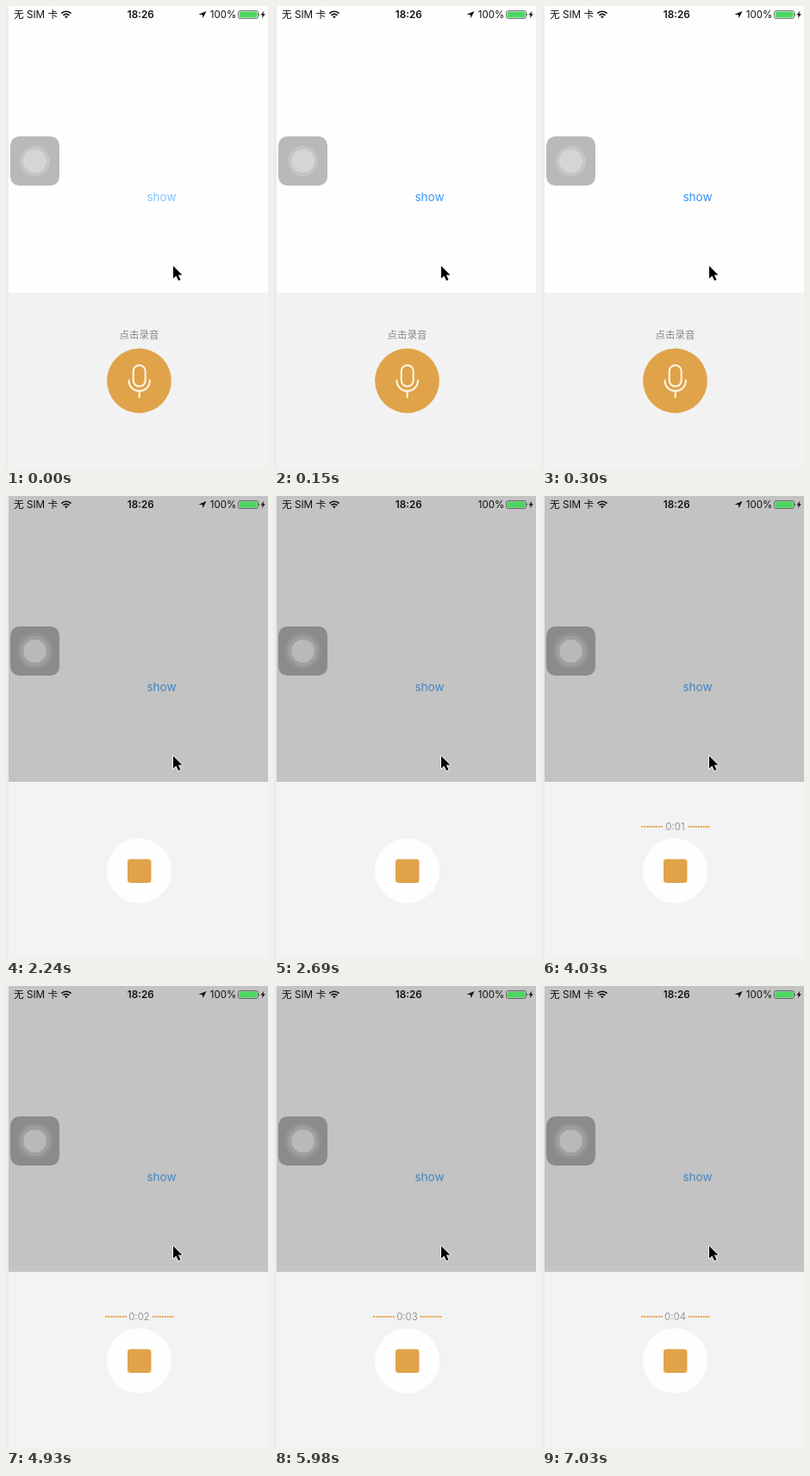
These frames come from a looping animation (304 by 535 pixels, 8 s). An HTML page:

```html
<!DOCTYPE html>
<html lang="zh">
<head>
<meta charset="utf-8">
<title>Recorder</title>
<style>
html, body { margin: 0; width: 100%; height: 100%; overflow: hidden; background: #ebebeb; }
svg { position: absolute; left: 0; top: 0; display: block; }
text { font-family: Inter, "Noto Sans CJK SC", "Noto Sans CJK", sans-serif; }
.idle, .live, .show, .arrow, .timer, .count::before { animation: 8s step-end infinite; }
.idle { animation-name: idle; }
.live { animation-name: live; }
.show { animation-name: show; }
.arrow { animation-name: arrow; }
.timer { animation-name: timer; }
.count {
  position: absolute; left: 134.5px; top: 376px; width: 40px; height: 14px;
  font: 11.4px/14px Inter, sans-serif; color: #979797; text-align: center;
}
.count::before { content: ""; animation-name: count; }
@keyframes idle { 0% { visibility: visible; } 28%, 100% { visibility: hidden; } }
@keyframes live { 0% { visibility: hidden; } 28%, 100% { visibility: visible; } }
@keyframes show {
  0% { fill: #87c1ff; }
  1.875% { fill: #3f97fb; }
  3.75% { fill: #3492fa; }
  28%, 100% { fill: #4585c2; }
}
@keyframes arrow { 0% { opacity: 1; } 33.625% { opacity: 0; } 39.25%, 100% { opacity: 1; } }
@keyframes timer { 0% { opacity: 0; } 35.5%, 100% { opacity: 1; } }
@keyframes count {
  0% { content: ""; }
  35.5% { content: "0:00"; }
  50.375% { content: "0:01"; }
  61.625% { content: "0:02"; }
  74.75% { content: "0:03"; }
  87.875%, 100% { content: "0:04"; }
}
</style>
</head>
<body>
<svg width="304" height="535" viewBox="0 0 304 535">
  <rect width="304" height="535" fill="#ebebeb"/>

  <g class="idle">
    <rect x="3" width="301" height="332" fill="#fefefe"/>
    <rect x="3" y="332" width="301" height="203" fill="#f2f2f2"/>
    <rect x="5" y="151" width="57" height="57" rx="10.5" fill="#b9b9b9"/>
    <circle cx="33.5" cy="179.5" r="17.5" fill="#c5c5c5"/>
    <circle cx="33.5" cy="179.5" r="13.5" fill="#d5d5d5"/>
    <text x="154.5" y="384.5" font-size="11.5" fill="#888" text-anchor="middle">点击录音</text>
    <circle cx="154.5" cy="434" r="37.4" fill="#e0a34a"/>
    <g fill="none" stroke="#fdf6ea" stroke-width="2" stroke-linecap="round">
      <rect x="147.7" y="416" width="14" height="24.5" rx="7"/>
      <path d="M142.4 433.5a12.3 12.3 0 0 0 24.6 0M154.7 446v7"/>
    </g>
  </g>

  <g class="live">
    <rect x="3" width="301" height="331" fill="#c3c3c3"/>
    <rect x="3" y="331" width="301" height="204" fill="#f3f3f3"/>
    <rect x="5" y="151" width="57" height="57" rx="10.5" fill="#8b8b8b"/>
    <circle cx="33.5" cy="179.5" r="21" fill="#939393"/>
    <circle cx="33.5" cy="179.5" r="17.5" fill="#9f9f9f"/>
    <circle cx="33.5" cy="179.5" r="13.3" fill="#b9b9b9"/>
    <circle cx="154.5" cy="434" r="37.6" fill="#fefefe"/>
    <rect x="141" y="420.5" width="27.5" height="27.5" rx="3.5" fill="#e0a34a"/>
  </g>

  <g class="timer" stroke="#e5a752" stroke-width="2" stroke-dasharray="2 .88">
    <path d="M115 383h25.2M169.5 383h25.2"/>
  </g>

  <text class="show" x="180.5" y="226" font-size="13.6" text-anchor="middle">show</text>

  <g fill="#111">
    <text x="9" y="14" font-size="11.7">无 SIM 卡</text>
    <text x="156.3" y="14" font-size="11.7" font-weight="600" text-anchor="middle">18:26</text>
    <text x="267.2" y="14" font-size="11.5" text-anchor="end">100%</text>
    <path class="arrow" d="M232.5 6l-4 8-.6-3.8-4.4-.4z"/>
    <g fill="none" stroke="#111" stroke-width="1.7">
      <path d="M64.3 8.6a7.8 7.8 0 0 1 11.2 0M66.5 10.8a4.8 4.8 0 0 1 6.8 0"/>
    </g>
    <path d="M69.9 14.2l-1.8-1.9a2.6 2.6 0 0 1 3.6 0z"/>
    <rect x="269.5" y="5.5" width="23" height="9" rx="2" fill="none" stroke="#555" stroke-width=".8"/>
    <rect x="270.6" y="6.6" width="20.8" height="6.8" rx="1" fill="#4cd562"/>
    <path d="M293.4 8.4q1.4 1.6 0 3.2z"/>
    <path d="M299.4 5.8l-4 4.8h2.4l-1 3.6 4-5h-2.4z"/>
  </g>

  <path d="M194 301v14.6l3.4-3.2 2.7 5.7 2.4-1.1-2.6-5.5h4.6z" fill="#000" stroke="#fff" stroke-width="1.6" stroke-linejoin="round" paint-order="stroke"/>
</svg>
<div class="count"></div>
</body>
</html>
```
